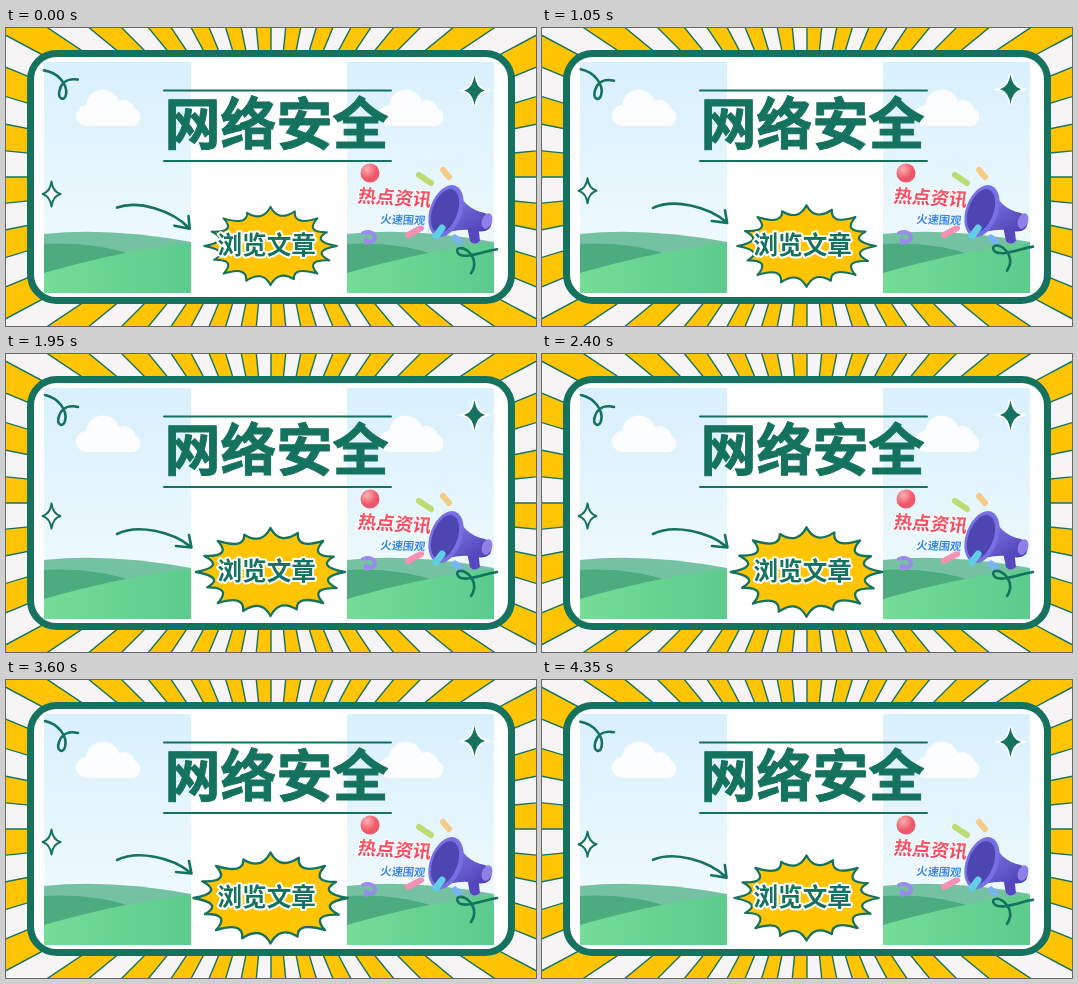
An HTML page for the animation above (4.5 s loop, 530 by 298 pixels).

```html
<!DOCTYPE html>
<html lang="zh">
<head>
<meta charset="utf-8">
<style>
  html, body { margin: 0; width: 100%; height: 100%; overflow: hidden; background: #f6f4f5; }
  svg { display: block; width: 100vw; height: 100vh; }
  text { font-family: "Noto Sans CJK SC", "Noto Sans CJK", sans-serif; font-weight: 900; paint-order: stroke; stroke-linejoin: round; }
  .line { fill: none; stroke: #14725f; stroke-width: 2.6; stroke-linecap: round; stroke-linejoin: round; }
</style>
</head>
<body>
<svg viewBox="0 0 530 298">
  <defs>
    <linearGradient id="sky" x2="0" y2="1"><stop stop-color="#d9f0fe"/><stop offset=".75" stop-color="#edf9fd"/></linearGradient>
    <linearGradient id="hill"><stop stop-color="#74dd97"/><stop offset="1" stop-color="#5ccb8d"/></linearGradient>
    <linearGradient id="hot" x2="0" y2="1"><stop stop-color="#ff6268"/><stop offset="1" stop-color="#f03a5c"/></linearGradient>
    <linearGradient id="cone" x2=".8" y2="1"><stop stop-color="#8b8bf2"/><stop offset="1" stop-color="#4b3fb4"/></linearGradient>
    <radialGradient id="ball" cx=".35" cy=".3"><stop stop-color="#ffb0b5"/><stop offset="1" stop-color="#ee5868"/></radialGradient>
    <g id="panel">
      <path fill="url(#sky)" d="M0 0H147V231H0Z"/>
      <path fill="#fff" opacity=".88" d="M43 64a10.500 10.500 0 0 1-1-21a17 17 0 0 1 33-4a12 12 0 0 1 16 8a9 9 0 0 1-2 17Z"/>
      <path fill="#74c2a2" d="M0 172Q65 165 147 180V231H0Z"/>
      <path fill="#4cab7f" d="M0 182Q50 179 92 194V231H0Z"/>
      <path fill="url(#hill)" d="M0 211Q80 188 147 181V231H0Z"/>
    </g>
  </defs>
  <path id="rays" fill="#ffc505" stroke="#14725f" stroke-width="1.4"/>
  <rect x="24.5" y="25.5" width="481" height="247" rx="26" fill="#fff" stroke="#14725f" stroke-width="7"/>
  <use href="#panel" x="38" y="34"/>
  <use href="#panel" x="341" y="34"/>

  <path class="line" style="stroke-width:2" d="M158 62.500H385M158 133H385"/>
  <text x="158.500" y="115.500" font-size="56" fill="#14725f" stroke="#14725f" stroke-width="1">网络安全</text>

  <g stroke-linecap="round">
    <circle cx="364" cy="145" r="9.5" fill="url(#ball)"/>
    <path stroke="#bddc72" stroke-width="6" d="M413 147L425 155"/>
    <path stroke="#f3cb84" stroke-width="6" d="M437 142L443 149"/>
    <path stroke="#f58fb3" stroke-width="6" d="M402 207L415 200"/>
    <path fill="none" stroke="#9b8bea" stroke-width="4" d="M357 205Q362 203 366 205A4.500 4.500 0 1 1 360 210L360 215"/>
  </g>
  <g transform="translate(351 174) rotate(3.5) skewX(-6)">
    <text font-size="18.4" fill="url(#hot)" stroke="#fff" stroke-width="2">热点资讯</text>
  </g>
  <g transform="translate(374 195) rotate(2) skewX(-6)">
    <text font-size="11.2" fill="#3287ee" stroke="#fff" stroke-width="1.5">火速围观</text>
  </g>
  <g id="megaphone" stroke-linecap="round">
    <path fill="#5547bd" d="M461 198L472 196L474 213Q468 218 464 213Z"/>
    <path fill="url(#cone)" d="M449 157Q457 181 479 185Q489 190 484 200Q478 206 466 202Q447 200 431 209Z"/>
    <ellipse cx="440" cy="183" rx="16" ry="27" transform="rotate(20 440 183)" fill="#7770e4"/>
    <ellipse cx="439" cy="183" rx="12.5" ry="23" transform="rotate(20 439 183)" fill="#4d45b0"/>
    <ellipse cx="481" cy="193" rx="5" ry="8" transform="rotate(20 481 193)" fill="#8e80e6"/>
    <path stroke="#61cde8" stroke-width="7" d="M430 208L436 200"/>
    <path stroke="#79b4f0" stroke-width="7" d="M449 210L453 213"/>
  </g>

  <path id="burst" fill="#ffc505" stroke="#14725f" stroke-width="2.4" stroke-linejoin="round"/>
  <text x="211.500" y="225.500" font-size="24.6" fill="#14725f" stroke="#fff" stroke-width="4">浏览文章</text>

  <path id="curlA" class="line" d="M39 41C52 44 62 56 59 67C57 74 50 71 53 62C56 53 64 51 72 53"/>
  <path id="curlB" class="line" d="M491 218C478 220 460 228 453 223C447 217 456 214 463 221C469 227 470 235 465 242"/>
  <path id="arrow" class="line" d="M111 180C131 170 166 177 185 193M183 181L185.500 193.500L170 192"/>
  <path id="starA" fill="#14725f" stroke="#fff" stroke-width="3.5" paint-order="stroke"/>
  <path id="starB" fill="#fff" stroke="#14725f" stroke-width="1.9" stroke-linejoin="round"/>
</svg>
<script>
const $ = id => document.getElementById(id);
const LOOP = 4500, STEP = 150, RAYS = 32, SWAP = 550;

function star(w, h) {
  const k = 0.16;
  return `M0 ${-h}Q${w * k} ${-h * k} ${w} 0Q${w * k} ${h * k} 0 ${h}Q${-w * k} ${h * k} ${-w} 0Q${-w * k} ${-h * k} 0 ${-h}Z`;
}

function rays(turn) {
  const point = a => `${265 + 500 * Math.cos(a)} ${149 + 500 * Math.sin(a)}`;
  const gap = 2 * Math.PI / RAYS;
  return Array.from({ length: RAYS }, (_, i) => {
    const a = (i + turn) * gap;
    return `M265 149L${point(a - gap / 4)}L${point(a + gap / 4)}Z`;
  }).join('');
}

// Spiky balloon: tips on an ellipse, joined by inward curves.
function burst() {
  const n = 16, reach = [1, .96, 1, .92];
  const at = (i, r) => {
    const a = (i / n) * 2 * Math.PI - Math.PI / 2;
    return `${78 * r * Math.cos(a)} ${46 * r * Math.sin(a)}`;
  };
  let d = `M${at(0, 1)}`;
  for (let i = 1; i <= n; i++) d += `Q${at(i - .5, .62)} ${at(i, reach[i % 4])}`;
  return d + 'Z';
}

function track(keys, p) {
  const i = keys.findIndex(k => k[0] > p);
  const [t0, a] = keys[i - 1], [t1, b] = keys[i];
  return a + (b - a) * (p - t0) / (t1 - t0);
}

const BOB = [[0, 8], [.1, 1], [.3, 0], [.6, 0], [.9, 4.5], [1, 8]];
const PULSE = [[0, .85], [.13, .97], [.25, 1], [.53, 1], [.87, .925], [1, .85]];

$('burst').setAttribute('d', burst());
$('starA').setAttribute('d', star(10.5, 15));
$('starB').setAttribute('d', star(9, 12.5));

function draw(ms) {
  const t = Math.floor(ms % LOOP / STEP) * STEP;
  const move = (id, value) => $(id).setAttribute('transform', value);
  const bob = track(BOB, t % 1500 / 1500);
  const pulse = track(PULSE, t % 1125 / 1125);
  $('rays').setAttribute('d', rays(Math.floor(t / SWAP) % 2 / 2 - .25));
  move('burst', `translate(264.500 218) scale(${pulse})`);
  move('arrow', `rotate(${bob * .75} 115 180)`);
  move('starA', `translate(468.500 ${61 + bob * .2})`);
  move('starB', `translate(45.500 ${162 + bob * .5})`);
  move('curlA', `rotate(${-bob * .6} 55 55)`);
  move('curlB', `translate(0 ${bob * .4})`);
}

const start = performance.now();
function tick() {
  draw(performance.now() - start);
  requestAnimationFrame(tick);
}
draw(0);
tick();
</script>
</body>
</html>
```
